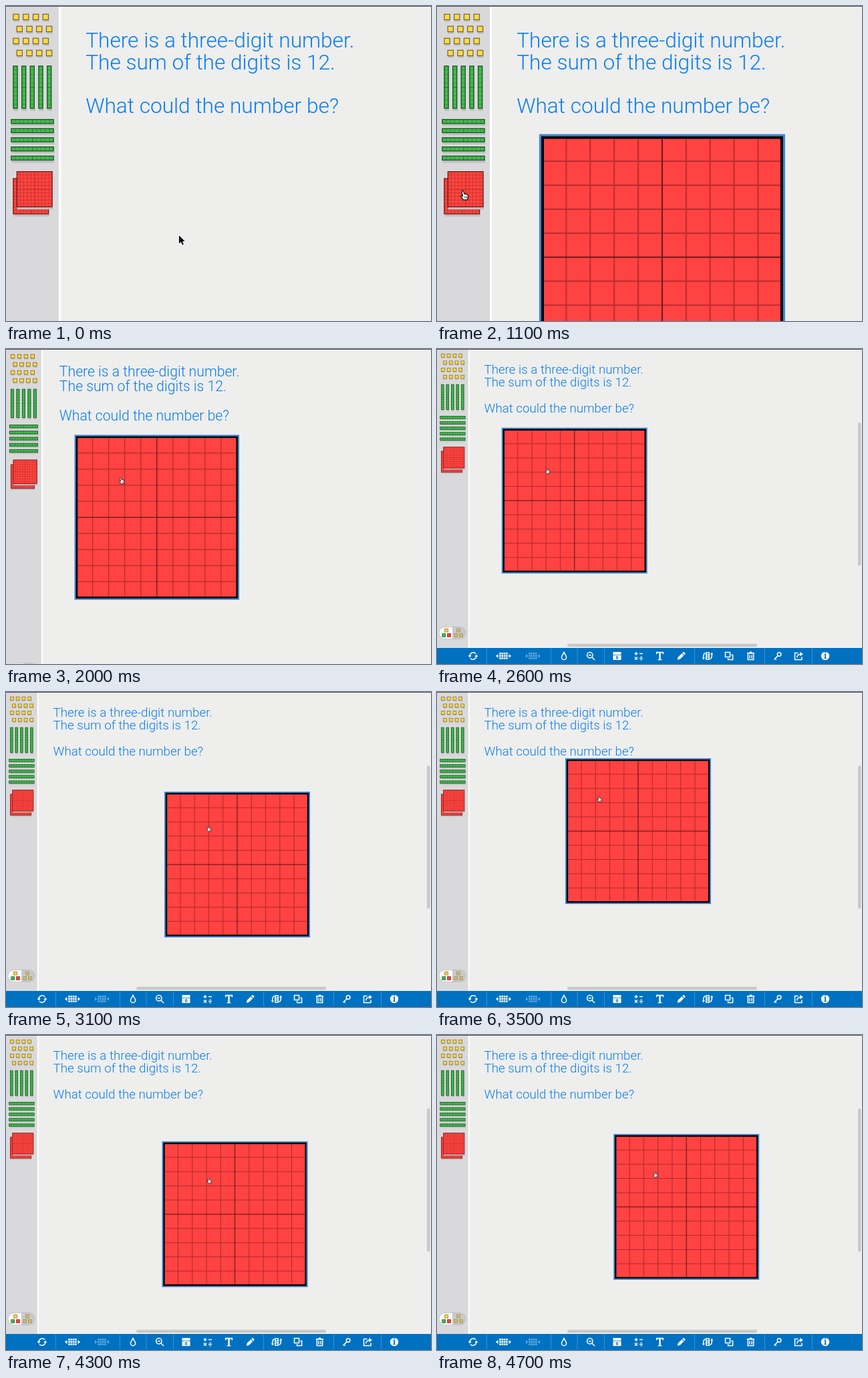
Animation of 636x471 px, one loop 5600 ms. Source, as an HTML page with a canvas:

```html
<!DOCTYPE html>
<html lang="en">
<head>
<meta charset="utf-8">
<title>Base ten blocks</title>
<style>
  html, body { margin: 0; width: 100%; height: 100%; overflow: hidden; background: #eeeeed; }
  canvas { display: block; }
</style>
</head>
<body>
<canvas id="stage" width="636" height="471"></canvas>
<script>
const ctx = document.getElementById('stage').getContext('2d');
const W = 636, H = 471, LOOP = 5600, STEP = 100, ZOOM = 1.688;
const BLUE = '#0071c1', RED = '#ff4242';
const LINES = [
  ['There is a three-digit number.', 36.6],
  ['The sum of the digits is 12.', 56],
  ['What could the number be?', 94.6]
];

// Font size at which the first line spans its column
ctx.font = '300 100px Roboto, sans-serif';
const textFont = `300 ${100 * 238.4 / ctx.measureText(LINES[0][0]).width}px Roboto, sans-serif`;

// Drag of the large block: time, left, top
const drag = [
  [2550, 90.6, 113.5], [2700, 112, 127], [2850, 160, 149], [3000, 212, 156],
  [3100, 237, 149], [3200, 240, 137], [3350, 226, 109], [3500, 192, 99],
  [3600, 170, 102], [3700, 155, 113], [3800, 153, 121], [3900, 154, 130],
  [4050, 171, 151], [4200, 208, 160], [4300, 233.5, 159], [4500, 259, 151],
  [4700, 264.2, 148]
];

function ease(t, from, to) {
  const u = Math.min(1, Math.max(0, (t - from) / (to - from)));
  return 0.5 - 0.5 * Math.cos(Math.PI * u);
}

// Smooth curve through timed points
function along(path, t) {
  const i = path.findIndex(p => p[0] > t);
  if (i < 0) return path[path.length - 1].slice(1);
  if (i === 0) return path[0].slice(1);
  const a = path[i - 1], b = path[i], prev = path[i - 2] || a, next = path[i + 1] || b;
  const dt = b[0] - a[0], u = (t - a[0]) / dt, v = 1 - u;
  return [1, 2].map(k => {
    const ma = (b[k] - prev[k]) / (b[0] - prev[0]) * dt;
    const mb = (next[k] - a[k]) / (next[0] - a[0]) * dt;
    return a[k] * (1 + 2 * u) * v * v + b[k] * u * u * (3 - 2 * u) + ma * u * v * v - mb * u * u * v;
  });
}

function rect(x, y, w, h, color) {
  ctx.fillStyle = color;
  ctx.fillRect(x, y, w, h);
}

function pill(x, y, w, h, r, color) {
  ctx.fillStyle = color;
  ctx.beginPath();
  ctx.roundRect(x, y, w, h, r);
  ctx.fill();
}

// Small block in the side bar, divided into cols by rows
function block(x, y, w, h, cols, rows, fill, line, edge) {
  rect(x + 0.5, y + h, w, 2, '#bebebf');
  rect(x, y, w, h, fill);
  ctx.globalAlpha = 0.75;
  for (let i = 1; i < cols; i++) rect(x + w * i / cols - 0.2, y, i === 5 ? 0.7 : 0.4, h, line);
  for (let i = 1; i < rows; i++) rect(x, y + h * i / rows - 0.2, w, i === 5 ? 0.7 : 0.4, line);
  ctx.globalAlpha = 1;
  ctx.strokeStyle = edge;
  ctx.lineWidth = 0.75;
  ctx.strokeRect(x + 0.3, y + 0.3, w - 0.6, h - 0.6);
}

function cube(x, y, color, edge) {
  rect(x - 2.8, y - 2.8, 5.6, 5.6, edge);
  rect(x - 2.1, y - 2.1, 4.2, 4.2, color);
}

function sideBar() {
  rect(0, 0, 46.8, H, '#d9d9db');
  rect(46.8, 0, 2, H, '#fdfdfd');
  for (let r = 0; r < 4; r++) {
    for (let c = 0; c < 4; c++) {
      const x = 8.9 + 8.75 * c + (r % 2) * 3.1, y = 9.7 + 10.65 * r;
      rect(x - 2.4, y + 2.8, 5.4, 1.4, '#bebebf');
      cube(x, y, '#ffda45', '#74622a');
    }
  }
  const green = ['#43b84c', '#1d6b2a', '#1c5427'];
  for (let i = 0; i < 5; i++) block(6.2 + 7.5 * i, 52.9, 4.2, 38, 1, 10, ...green);
  for (let i = 0; i < 5; i++) block(4.4, 100.2 + 8.1 * i, 38, 4.2, 10, 1, ...green);
  const red = ['#ff4540', '#ad2826', '#6b1c1a'];
  block(6.2, 152.6, 31.8, 31.8, 10, 10, ...red);
  block(9.4, 146.4, 31.8, 31.8, 10, 10, ...red);

  pill(2.5, 415, 41, 19, 9.5, '#b9b9ba');
  pill(23, 415.7, 19.8, 17.6, [0, 9, 9, 0], '#c9c9ca');
  pill(3.2, 415.7, 19.8, 17.6, [9, 0, 0, 9], '#fafafa');
  cube(14, 420.6, '#ffd23f', '#8a7630');
  cube(10.2, 428, '#3fb548', '#27682c');
  cube(18, 428, '#f5413c', '#7d2522');
  for (const [x, y] of [[32, 420.6], [28.2, 428], [36, 428]]) cube(x, y, '#cdb96c', '#9b8f62');
}

function bigBlock(x, y) {
  rect(x, y, 218, 218, '#3f86d4');
  rect(x + 1.9, y + 1.9, 214.2, 214.2, '#000');
  rect(x + 4.2, y + 4.2, 209.6, 209.6, RED);
  for (const i of [-4, -3, -2, -1, 1, 2, 3, 4, 0]) {
    const at = 109 + 21.25 * i - 0.55, color = i ? '#b52d2d' : '#641717';
    rect(x + at, y + 4.2, 1.1, 209.6, color);
    rect(x + 4.2, y + at, 209.6, 1.1, color);
  }
}

let dots = '';
for (let i = 0; i < 12; i++) dots += `M${-6.3 + 3.3 * (i % 4)},${-5 + 3.6 * (i / 4 | 0)}h2.6v2.6h-2.6z`;

// Tool icons: centre, outline, solid part, colour
const icons = [
  [54, 'M-4.8,-1A5,5 0 0 1 4,-3.4M4.8,1A5,5 0 0 1 -4,3.4', 'M-7.4,-1h5l-2.5,3.4zM7.4,1h-5l2.5,-3.4z'],
  [99.5, '', dots + 'M-8,-3v6l-3.6,-3zM8,-3v6l3.6,-3z'],
  [143.5, '', dots + 'M-10.5,-3v6l3.4,-3zM10.5,-3v6l-3.4,-3z', '#62a9dc'],
  [190, 'M0,-5.5C1,-3 3.6,-.6 3.6,2A3.6,3.6 0 0 1 -3.6,2C-3.6,-.6 -1,-3 0,-5.5Z', ''],
  [230, 'M3,-1.2A4.2,4.2 0 1 1 -5.4,-1.2A4.2,4.2 0 1 1 3,-1.2M2,2L6,6M-3.2,-1.2h4', ''],
  [269.5, '', 'M-6,-6h12v4.2h-12zM-6,-1h12v7h-12z'],
  [301.5, 'M-6,-3.5h5M-3.5,-6v5M1.5,-3.5h5M-5.5,1.5l4,4M-1.5,1.5l-4,4M1.5,3.5h5', 'M3.2,.6h1.7v1.5h-1.7zM3.2,5h1.7v1.5h-1.7z'],
  [333.5, '', 'M-5.6,-6.3H5.6V-2.8H4.3L3.7,-4.6H1.2V4.8L3,5.3V6.3H-3V5.3L-1.2,4.8V-4.6H-3.7L-4.3,-2.8H-5.6Z'],
  [365.5, '', 'M-5.8,5.8l1,-4l5.6,-5.6l3,3l-5.6,5.6zM1.6,-4.6l1.2,-1.2q.8,-.6 1.5,0l1.5,1.5q.6,.8 0,1.5l-1.2,1.2z'],
  [405, 'M-3.6,-4.5Q-7,-3 -6.2,3.5M3.6,4.5Q7,3 6.2,-3.5M-2.2,-5h4.4v10h-4.4zM-2.2,-1.6h4.4M-2.2,1.6h4.4', 'M-8.2,2.2h4.2l-2.2,3.2zM8.2,-2.2h-4.2l2.2,-3.2z'],
  [437, 'M-5.5,-5.5h7v7h-7zM3.2,-1.6h2.4v7h-7v-2.4', ''],
  [469.5, 'M-4.2,-3v8.6h8.4v-8.6M-1.6,-1.4v5M1.6,-1.4v5', 'M-5.6,-5h3.4l.8,-1.4h2.8l.8,1.4h3.4v1.8h-11.2z'],
  [509.5, 'M5.4,-2.4A2.8,2.8 0 1 1 -.2,-2.4A2.8,2.8 0 1 1 5.4,-2.4M.6,-.4L-5,5.2M-3.6,3.8l1.8,1.8', ''],
  [541, 'M-.5,-4.4h-5v9.8h10.4v-4M-2.4,2.4Q-2,-2.4 3,-2.8', 'M2.4,-6.2l4.4,3.4l-4.4,3.4z'],
  [581, '', 'M6.2,0A6.2,6.2 0 1 1 -6.2,0A6.2,6.2 0 1 1 6.2,0Z']
].map(([x, line, solid, color = '#fff']) => ({ x, line: new Path2D(line), solid: new Path2D(solid), color }));

function label(text, x, y, font, color) {
  ctx.font = font;
  ctx.fillStyle = color;
  ctx.fillText(text, x, y);
}

function toolBar() {
  pill(630, 110, 4.5, 214, 2.2, '#c8c8c8');
  pill(195, 440.8, 284, 4.4, 2.2, '#c8c8c8');
  rect(0, 447, W, 24, BLUE);
  for (const x of [74, 170, 209.5, 250, 385, 490, 561]) rect(x, 448, 1, 22, '#3b90cf');
  ctx.lineWidth = 1.5;
  for (const icon of icons) {
    ctx.save();
    ctx.translate(icon.x, 459);
    ctx.fillStyle = ctx.strokeStyle = icon.color;
    ctx.stroke(icon.line);
    ctx.fill(icon.solid);
    ctx.restore();
  }
  ctx.textAlign = 'center';
  label('6', 269.5, 464.4, 'bold 7px Roboto, sans-serif', BLUE);
  label('i', 581, 463.2, 'bold 12px "Noto Serif", serif', BLUE);
  ctx.textAlign = 'left';
}

const arrow = new Path2D('M0,0V7.2L1.7,5.7L2.9,8.4L4.1,7.9L2.9,5.2H5.2Z');
const hand = new Path2D('M-2.4,-3.4Q-1.6,-4.7 -.8,-3.5L-.1,-1.3L2.4,-.8Q3.4,-.3 3.2,1.2L2.7,4H-.9L-3.1,1.3Q-3.5,.3 -2.5,.3L-1.5,.9Z');
const knuckles = new Path2D('M.3,1v1.6M1.3,1v1.6M2.1,1v1.6');

function cursor(x, y, pointing) {
  ctx.save();
  ctx.lineJoin = 'round';
  if (pointing) {
    ctx.translate(x, y);
    ctx.fillStyle = '#fff';
    ctx.strokeStyle = '#111';
    ctx.lineWidth = 0.75;
    ctx.fill(hand);
    ctx.stroke(hand);
    ctx.lineWidth = 0.4;
    ctx.stroke(knuckles);
  } else {
    ctx.translate(x - 1.3, y - 4.2);
    ctx.strokeStyle = '#fff';
    ctx.lineWidth = 1.1;
    ctx.stroke(arrow);
    ctx.fillStyle = '#000';
    ctx.fill(arrow);
  }
  ctx.restore();
}

function draw(t) {
  const scale = ZOOM - (ZOOM - 1) * ease(t, 1170, 2335);
  ctx.setTransform(scale, 0, 0, scale, 0, 0);
  rect(0, 0, W, H, '#eeeeed');
  sideBar();
  for (const [text, y] of LINES) label(text, 70.6, y, textFont, '#087bf0');
  if (t >= 1100) bigBlock(...along(drag, t));
  toolBar();

  // The pointer runs slightly ahead of the block it drags
  const toStack = ease(t, 200, 750), toBlock = ease(t, 1300, 2000);
  const [px, py] = along(drag, t + 50);
  cursor(154.7 - 130.4 * toStack + 129 * toBlock + px - drag[0][1],
         207.4 - 39.7 * toStack + 6.5 * toBlock + py - drag[0][2],
         t >= 600);

  ctx.setTransform(1, 0, 0, 1, 0, 0);
  rect(0, 0, W, 1, '#505050');
}

const start = performance.now();
function tick() {
  const t = (performance.now() - start) % LOOP;
  draw(Math.floor(t / STEP) * STEP);
  requestAnimationFrame(tick);
}
tick();
</script>
</body>
</html>
```
